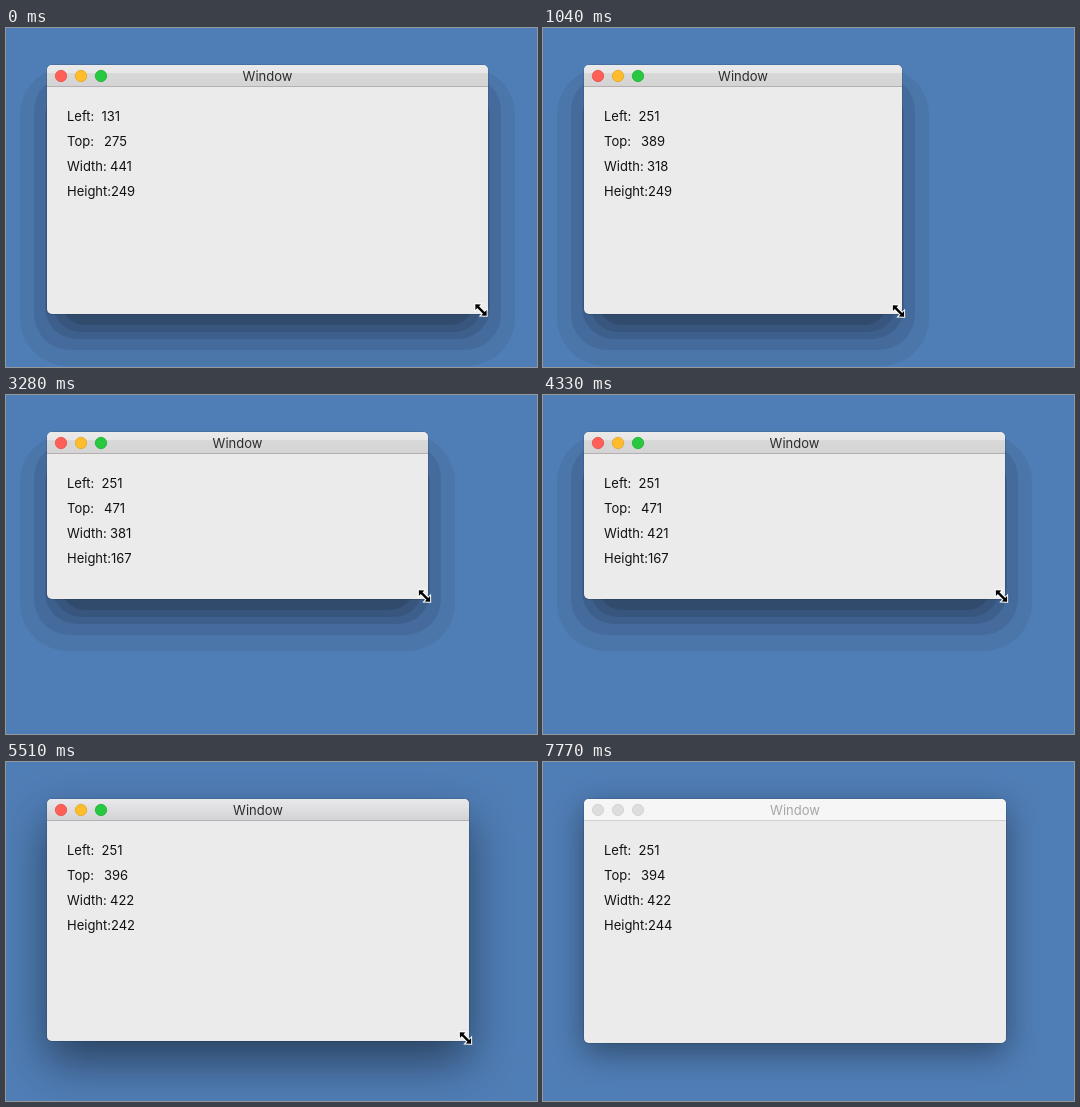
Animation of 531 by 339 pixels, one loop 7.87 s. Source, as an HTML page with a canvas:

```html
<!DOCTYPE html>
<html lang="en">
<head>
<meta charset="utf-8">
<title>Window resize</title>
<style>
  html, body { margin: 0; width: 100%; height: 100%; overflow: hidden; background: #4f7db5; }
  canvas { display: block; width: 531px; height: 339px; }
</style>
</head>
<body>
<canvas id="stage"></canvas>
<script>
const W = 531, H = 339, LOOP = 7870, TICK = 150;
const X = 41, Y = 37, BAR = 21.5;
const BLURRED_AT = 5370, RELEASE_AT = 7000, LEAVE_AT = 7150, INACTIVE_AT = 7770;
const FONT = '13px Inter, "Open Sans", sans-serif';

const canvas = document.getElementById('stage');
const ctx = canvas.getContext('2d');
const dpr = window.devicePixelRatio || 1;
canvas.width = Math.round(W * dpr);
canvas.height = Math.round(H * dpr);

const linear = x => x;
const settle = x => 1 - (1 - x ** 1.4) ** 4;
const smooth = x => x * x * (3 - 2 * x);

// Each drag: start, end, number of steps, final width and height, easing
const drags = [
  [150, 1040, 7, 318, 249, smooth],
  [1640, 2390, 6, 320, 167, settle],
  [2830, 3730, 7, 420, 167, smooth],
  [4180, 4180, 1, 421, 167, linear],
  [4480, 4930, 4, 423, 218, linear],
  [5080, 5510, 4, 422, 242, linear],
  [5810, 5960, 2, 422, 243, linear],
  [6260, 6560, 3, 422, 244, linear]
];

function sizeAt(t) {
  let w = 441, h = 249;
  for (const [start, end, steps, w1, h1, ease] of drags) {
    if (t < start) break;
    const step = t >= end ? steps : Math.floor((t - start) / TICK) + 1;
    const k = ease(step / steps);
    w += (w1 - w) * k;
    h += (h1 - h) * k;
  }
  return [Math.round(w), Math.round(h)];
}

function box(x, y, w, h, r, fill) {
  ctx.beginPath();
  ctx.roundRect(x, y, w, h, r);
  ctx.fillStyle = fill;
  ctx.fill();
}

// Shadow layers: side outset, top inset, bottom outset, radius, colour
const layers = [
  [27, 2, 52, 48, '#4b76aa'],
  [13, 10, 36, 36, '#456b9d'],
  [2, 20, 25, 32, '#3d5f8c'],
  [-6, 30, 18, 28, '#37557d'],
  [-14, 40, 11, 24, '#314b6d']
];

function layeredShadow(w, h) {
  for (const [side, top, bottom, r, color] of layers) {
    box(X - side, Y + top, w + 2 * side, h + bottom - top, r, color);
  }
}

function softShadow(w, h, offset, blur, alpha) {
  ctx.save();
  ctx.shadowColor = `rgba(0,0,0,${alpha})`;
  ctx.shadowOffsetY = offset * dpr;
  ctx.shadowBlur = blur * dpr;
  box(X, Y, w, h, 5, '#ebebeb');
  ctx.restore();
}

function text(str, x, y, color, align = 'left') {
  ctx.font = FONT;
  ctx.textAlign = align;
  ctx.fillStyle = color;
  ctx.fillText(str, x, y);
}

function barFill(t) {
  if (t >= INACTIVE_AT) return '#f6f6f6';
  const g = ctx.createLinearGradient(0, Y, 0, Y + BAR);
  if (t >= BLURRED_AT) {
    g.addColorStop(0, '#e9e8ea');
    g.addColorStop(1, '#d3d2d4');
  } else {
    g.addColorStop(0, '#eaeaea');
    g.addColorStop(0.37, '#e6e6e6');
    g.addColorStop(0.4, '#d9d8d9');
    g.addColorStop(1, '#d5d4d5');
  }
  return g;
}

function buttons(active) {
  const colors = active
    ? [['#ff5f57', '#e2463f'], ['#ffbd2e', '#e1a116'], ['#28c940', '#12ac28']]
    : Array(3).fill(['#dddddd', '#cecece']);
  colors.forEach(([fill, line], i) => {
    ctx.beginPath();
    ctx.arc(55 + 20 * i, 48, 5.7, 0, 2 * Math.PI);
    ctx.fillStyle = fill;
    ctx.fill();
    ctx.strokeStyle = line;
    ctx.lineWidth = 0.7;
    ctx.stroke();
  });
}

function drawWindow(t, w, h) {
  const active = t < INACTIVE_AT;
  if (!active) softShadow(w, h, 10, 32, 0.4);
  else if (t >= BLURRED_AT) softShadow(w, h, 21, 46, 0.47);
  else layeredShadow(w, h);

  box(X - 0.5, Y - 0.5, w + 1, h + 1, 5.5, 'rgba(0,0,0,0.2)');
  box(X, Y, w, h, 5, '#ebebeb');
  box(X, Y, w, BAR, [5, 5, 0, 0], barFill(t));
  ctx.fillStyle = active ? '#b3afb3' : '#d0d0d0';
  ctx.fillRect(X, 58, w, 1);
  buttons(active);
  text('Window', X + w / 2, 53, active ? '#2c2c2c' : '#a6a6a6', 'center');

  const moved = t >= 150;
  const rows = [
    ['Left:', 95.5, moved ? 251 : 131],
    ['Top:', 98, moved ? 638 - h : 275],
    ['Width:', 104, w],
    ['Height:', 105, h]
  ];
  rows.forEach(([label, x, value], i) => {
    const y = 93 + 25 * i;
    text(label, 61, y, '#111');
    text(String(value), x, y, '#111');
  });
}

function cursor(x, y) {
  const half = [[-8, 0], [-4, -3.9], [-4, -1.2], [4, -1.2], [4, -3.9]];
  ctx.save();
  ctx.translate(x, y);
  ctx.rotate(Math.PI / 4);
  ctx.beginPath();
  for (const s of [1, -1]) {
    for (const [px, py] of half) ctx.lineTo(px * s, py * s);
  }
  ctx.closePath();
  ctx.lineJoin = 'miter';
  ctx.lineWidth = 2;
  ctx.strokeStyle = '#fff';
  ctx.stroke();
  ctx.fillStyle = '#000';
  ctx.fill();
  ctx.restore();
}

function draw(t) {
  const [w, h] = sizeAt(t);
  ctx.setTransform(dpr, 0, 0, dpr, 0, 0);
  ctx.fillStyle = '#4f7db5';
  ctx.fillRect(0, 0, W, H);
  drawWindow(t, w, h);
  if (t < 150) cursor(475, 282);
  else if (t < RELEASE_AT) cursor(X + w - 3.5, Y + h - 3);
  else if (t < LEAVE_AT) cursor(457.5, 279);
}

const begin = performance.now();
function frame() {
  draw((performance.now() - begin) % LOOP);
  requestAnimationFrame(frame);
}
frame();
</script>
</body>
</html>
```
